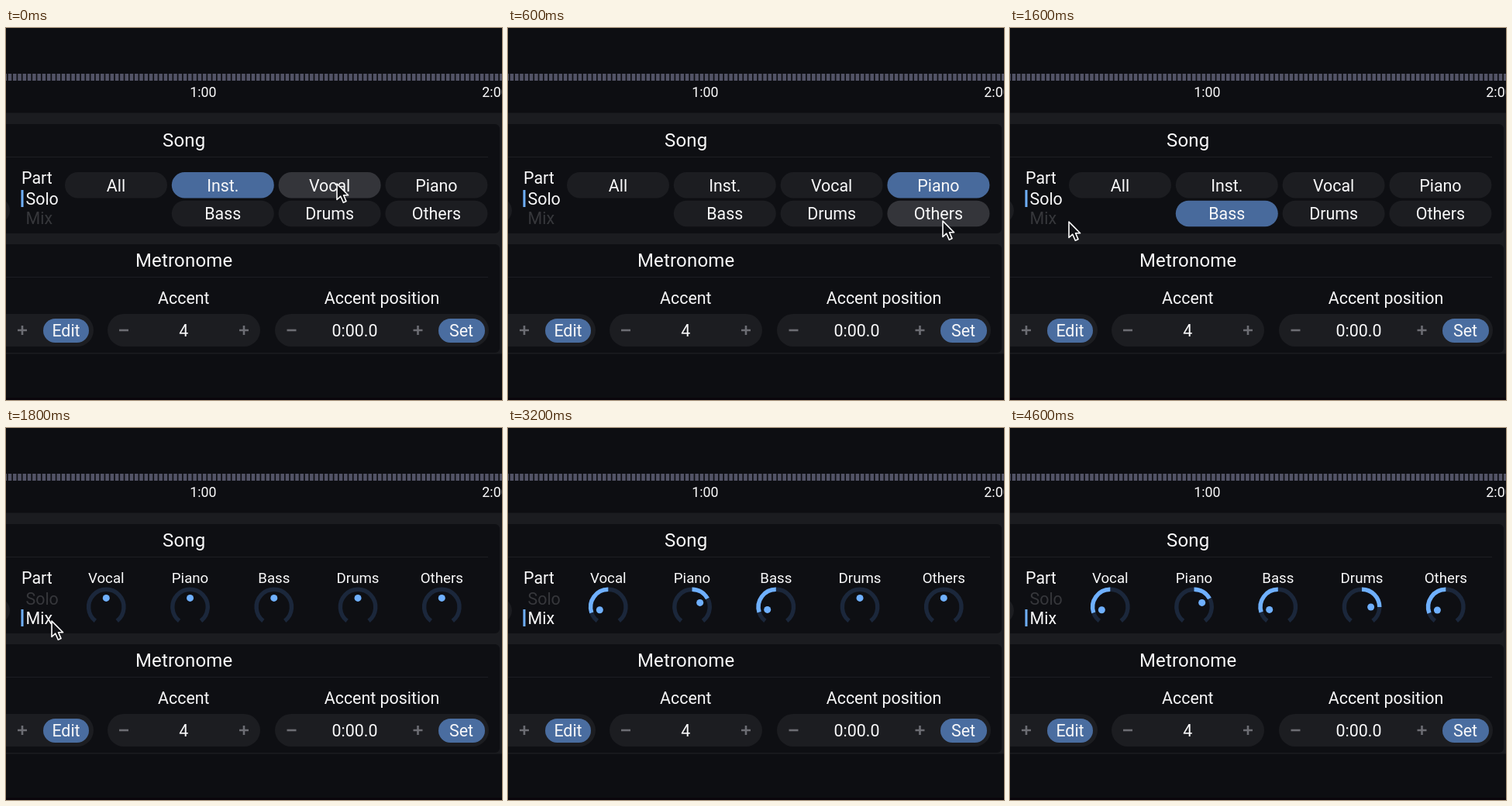
Write an HTML page that moves like this. It is 640 by 480 pixels and loops after 4800 ms.

```html
<!DOCTYPE html>
<html lang="en">
<head>
<meta charset="utf-8">
<style>
  html, body { margin: 0; width: 100%; height: 100%; overflow: hidden; background: #0d0e12; }
  svg { display: block; width: 640px; height: 480px; }
  text { font: 21.4px Roboto, "Liberation Sans", sans-serif; fill: #f8f8f9; }
  .mid { text-anchor: middle; }
  .title { font-size: 24px; letter-spacing: .2px; }
  .knob { font-size: 18.7px; }
  .time { font-size: 17.8px; }
  .pill { fill: #1c1d21; }
  .blue { fill: #4a6da0; }
  .sign { stroke: #6c6d73; stroke-width: 2.6; }
  .line { stroke: #1d1e23; }
</style>
</head>
<body>
<svg id="stage" viewBox="0 0 640 480"></svg>
<script>
const STEP = 200, STEPS = 24, MIX_STEP = 9;
const BRIGHT = '#6fb0ff';

const rect = (x, y, w, h, r, attrs) =>
  `<rect x="${x}" y="${y}" width="${w}" height="${h}" rx="${r}" ${attrs}/>`;
const pill = (x, y, w, h, cls = 'pill') => rect(x, y, w, h, h / 2, `class="${cls}"`);
const text = (s, x, y, cls = 'mid', attrs = '') =>
  `<text x="${x}" y="${y}" class="${cls}" ${attrs}>${s}</text>`;
const sign = (x, plus) =>
  `<path class="sign" d="M${x - 6} 390h12${plus ? `M${x} 384v12` : ''}"/>`;
const rule = y => `<path class="line" d="M0 ${y}H622"/>`;

const buttons = [['All', 0, 0], ['Inst.', 1, 0], ['Vocal', 2, 0], ['Piano', 3, 0],
  ['Bass', 1, 1], ['Drums', 2, 1], ['Others', 3, 1]]
  .map(([name, col, row]) => ({ name, x: 76 + col * 137.8, y: 186 + row * 36.7 }));

// Selected part: [first step, name]; the button is lit brightly while pressed.
const presses = [[-1, 'Inst.'], [1, 'Vocal'], [2, 'Piano'], [4, 'Others'], [6, 'Drums'], [7, 'Bass']];

// Each knob is dragged from 0 to its angle between two steps.
const knobs = [['Vocal', -109, 10, 12], ['Piano', 61, 13, 14], ['Bass', -107, 15, 16],
  ['Drums', 90, 17, 18], ['Others', -110, 20, 23]]
  .map(([name, angle, from, to], i) => ({ name, angle, from, to, x: 129.3 + i * 108.25 }));

// Pointer tip by step.
const pointer = [[0, 427, 201], [1, 427, 201], [2, 548, 204], [3, 561, 249], [4, 561, 249],
  [5, 466, 248], [6, 388, 248], [7, 278, 247], [8, 76, 250], [9, 59, 249], [10, 128, 225],
  [13, 236, 225], [15, 344, 225], [17, 453, 225], [19, 493, 111], [20, 561, 225]];

function backdrop() {
  let s = rect(0, 0, 640, 480, 0, 'fill="#0d0e12"') +
    rect(0, 109.5, 640, 311, 0, 'fill="#1b1c20"') +
    rect(-20, 124, 657, 141, 6, 'fill="#0e0f13"') +
    rect(-20, 279, 657, 140, 6, 'fill="#0e0f13"') +
    rect(0, 477, 640, 3, 0, 'fill="#0a060c"');
  for (let x = -3.6; x < 640; x += 6.28) s += rect(x, 59, 4.6, 9, 0, 'fill="#525366"');
  s += text('1:00', 254.3, 88.5, 'mid time') + text('2:00', 631.5, 88.5, 'mid time');
  s += text('Song', 229.7, 153, 'mid title') + text('Metronome', 229.7, 308, 'mid title');
  s += rule(166.5) + rule(321.5);
  s += text('Accent', 229.3, 356) + text('Accent position', 485, 356);
  s += pill(-60, 219, 65, 33) + pill(-100, 369, 213, 42) + pill(131, 369, 197, 42) + pill(347, 369, 276, 42);
  s += pill(48, 375, 59, 31, 'blue') + pill(558, 375, 60, 31, 'blue');
  s += text('Edit', 77.5, 398) + text('4', 229.3, 398) + text('0:00.0', 450, 398) + text('Set', 587.5, 398);
  s += sign(21, true) + sign(152) + sign(307, true) + sign(368.5) + sign(531.5, true);
  return s + text('Part', 20, 201, '');
}

function partMode(mix) {
  const dim = 'style="fill:#36373b"';
  return rect(19.5, mix ? 234 : 209, 3, 22, 0, `fill="${BRIGHT}"`) +
    text('Solo', 25.5, 227.5, '', mix ? dim : '') +
    text('Mix', 25.5, 253, '', mix ? '' : dim);
}

function drawButtons(step, tip) {
  const [since, selected] = presses.filter(p => p[0] <= step).pop();
  return buttons.map(({ name, x, y }) => {
    const over = tip && tip[1] > x && tip[1] < x + 132 && tip[2] > y && tip[2] < y + 33.5;
    const fill = name === selected ? (since === step ? BRIGHT : '#486a9c') : over ? '#34353a' : '#1c1d21';
    return rect(x, y, 132, 33.5, 16.75, `fill="${fill}"`) + text(name, x + 66, y + 24.7);
  }).join('');
}

function drawKnob({ name, x, angle, from, to }, step) {
  const turn = angle * Math.min(1, Math.max(0, (step - from) / (to - from)));
  const cy = 231;
  const at = (deg, r) => {
    const a = deg * Math.PI / 180;
    return [x + r * Math.sin(a), cy - r * Math.cos(a)];
  };
  const arc = (a, b, color) => `<path d="M${at(a, 22.7)}A22.7 22.7 0 ${+(b - a > 180)} 1 ${at(b, 22.7)}"
    fill="none" stroke="${color}" stroke-width="5.4"/>`;
  const [dx, dy] = at(turn, 11.6);
  return text(name, x, 199.5, 'mid knob') + arc(-142, 142, '#1b273b') +
    (turn ? arc(Math.min(0, turn), Math.max(0, turn), BRIGHT) : '') +
    `<circle cx="${dx}" cy="${dy}" r="4.5" fill="${BRIGHT}"/>`;
}

const drawPointer = ([, x, y]) => `<path transform="translate(${x} ${y})"
  d="M0 0V20.5L4.8 16.2L8.3 24.2L12 22.6L8.6 14.8H14.6Z"
  fill="#111216" stroke="#fff" stroke-width="1.6" stroke-linejoin="round"/>`;

const stage = document.getElementById('stage');
stage.innerHTML = backdrop() + '<g id="live"></g>';
const live = document.getElementById('live');
let shown = -1;

function draw(now) {
  const step = Math.floor(now / STEP) % STEPS;
  if (step !== shown) {
    shown = step;
    const tip = pointer.find(p => p[0] === step);
    const mix = step >= MIX_STEP;
    live.innerHTML = partMode(mix) +
      (mix ? knobs.map(k => drawKnob(k, step)).join('') : drawButtons(step, tip)) +
      (tip ? drawPointer(tip) : '');
  }
  requestAnimationFrame(draw);
}
const start = performance.now();
const tick = () => draw(Math.max(0, performance.now() - start));
draw = (inner => () => { inner(performance.now() - start); })(draw);
tick();
</script>
</body>
</html>
```
